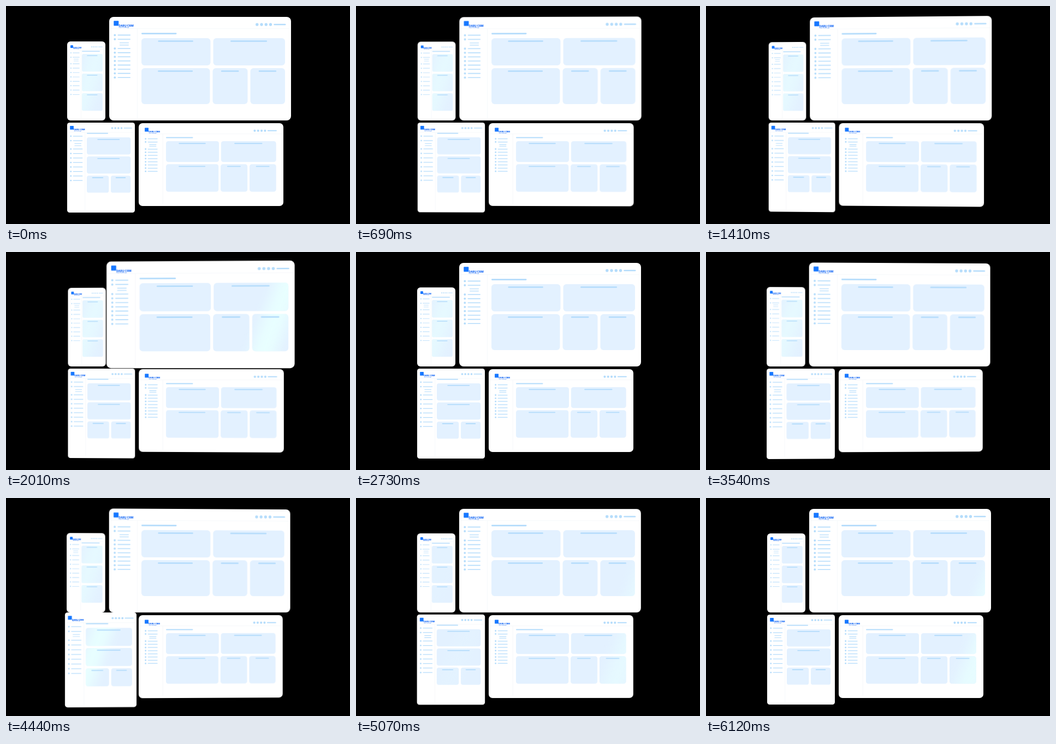
An HTML page for the animation above (6.45 s loop, 630 px wide and 400 px high).

```html
<!DOCTYPE html>
<html lang="en">
<head>
<meta charset="utf-8">
<title>Tilting dashboards</title>
<style>
html, body { margin: 0; width: 100%; height: 100%; overflow: hidden; background: #000; }
svg { display: block; position: absolute; left: 0; top: 0; width: 630px; height: 400px; transform-origin: 315px 205px; }
text { font-family: Inter, "Open Sans", sans-serif; fill: #1769f5; }
.name { font-weight: 800; }
.tag { font-weight: 600; }
</style>
</head>
<body>
<svg id="scene" viewBox="0 0 630 400"></svg>
<script>
const LOOP = 6450;
const BLUE = '#1677ff', LINE = '#b4dcfb', CARD = '#e3f1ff', EDGE = '#f2f6fa', SHINE = '#e8ffff';

// Timing: ramp eases 0 to 1; pulse rises over a..b and falls over c..d.
const clamp = u => Math.min(1, Math.max(0, u));
const ramp = (t, a, b) => { const u = clamp((t - a) / (b - a)); return u * u * (3 - 2 * u); };
const pulse = (t, a, b, c, d) => ramp(t, a, b) - ramp(t, c, d);
const glide = (t, a, b, from, to) => to - (to - from) * (1 - clamp((t - a) / (b - a))) ** 2;

// Degrees; positive brings the right side nearer.
const turn = t => 5 * pulse(t, 250, 1350, 1450, 2750) - 2.9 * pulse(t, 2700, 3600, 4440, 5280);

const rect = (x, y, w, h, r, fill) =>
  `<rect x="${x}" y="${y}" width="${w}" height="${h}" rx="${r}" fill="${fill}"/>`;
const dot = (x, y, r) => `<circle cx="${x}" cy="${y}" r="${r}" fill="${LINE}"/>`;
const bar = (x, y, w, th) => rect(x, y - th / 2, w, th, th / 2, LINE);
const repeat = (n, make) => Array.from({ length: n }, (_, i) => make(i)).join('');

function logo({ x, y }, k) {
  return rect(x, y, 9 * k, 9 * k, 0.8 * k, BLUE) +
    `<text class="name" x="${x + 9.3 * k}" y="${y + 11 * k}" font-size="${5 * k}">DARU CRM</text>` +
    `<text class="tag" x="${x + 9.3 * k}" y="${y + 13 * k}" font-size="${1.75 * k}">Simple Cloud Manager</text>`;
}

// Ten rows; two short sub-rows sit in the fold after the second.
function sidebar({ x, y, step, fold }, k) {
  const rowY = i => i < 2 ? y + step * i : y + fold + step * (i - 2);
  return repeat(10, i => dot(x, rowY(i), 1.9 * k) + bar(x + 5.2 * k, rowY(i), 23.5 * k, 1.6 * k)) +
    repeat(2, i => bar(x + 8.7 * k, y + fold * (0.58 + 0.16 * i), 17 * k, 1.4 * k));
}

function header({ x, y, k }) {
  return repeat(4, i => dot(x + 8.23 * k * i, y, 2.7 * k)) + bar(x + 30.5 * k, y, 22.2 * k, 2.5 * k);
}

// Each grid row is a height followed by the card widths.
function layout({ x, y, gap, rows }) {
  const cards = [];
  for (const [h, ...widths] of rows) {
    let left = x;
    for (const w of widths) {
      cards.push({ x: left, y, w, h });
      left += w + gap;
    }
    y += h + gap;
  }
  return cards;
}

function content(id, c) {
  const { k, th, grid } = c, cards = layout(grid);
  const fills = fill => cards.map(a => rect(a.x, a.y, a.w, a.h, th * 2.2, fill)).join('');
  return fills(CARD) + `<g id="shine-${id}">${fills(`url(#glare-${id})`)}</g>` +
    cards.map(a => bar(a.x + a.w * 0.24, a.y + th * 2.1, a.w * 0.51, th)).join('') +
    bar(grid.x, grid.y - c.titleUp, c.titleWidth, th) +
    logo(c.logo, k) + sidebar(c.side, k) + header(c.head);
}

const desktop = {
  k: 1, th: 2.6, titleUp: 8.4, titleWidth: 64.5,
  logo: { x: 197.3, y: 27.2 },
  side: { x: 199.3, y: 53.4, step: 7.6, fold: 24.6 },
  head: { x: 459.8, y: 34, k: 1 },
  grid: { x: 248, y: 59, gap: 5, rows: [[50, 126.5, 131.5], [66, 125.5, 64, 63.5]] }
};
const tablet = {
  k: 0.75, th: 1.8, titleUp: 7.4, titleWidth: 39,
  logo: { x: 117.2, y: 220 },
  side: { x: 118.8, y: 238.8, step: 8.25, fold: 23.6 },
  head: { x: 194.5, y: 224, k: 0.69 },
  grid: { x: 148, y: 241, gap: 3.7, rows: [[31.4, 80.3], [31.4, 80.3], [31.4, 40.3, 36.3]] }
};
const phone = {
  k: 0.55, th: 1.4, titleUp: 5, titleWidth: 33,
  logo: { x: 118, y: 72 },
  side: { x: 119, y: 86, step: 8.05, fold: 20 },
  head: { x: 157, y: 75, k: 0.38 },
  grid: { x: 139, y: 88, gap: 3.7, rows: [[32.3, 38], [32.3, 38], [32.3, 38]] }
};

// lift: hover amount; shine: glare strength; shineX: glare centre.
const panels = [
  { id: 'phone', content: phone, x: 112, y: 65, w: 70, h: 145, r: 6, ruleX: 137.5, ruleY: 80, glare: [38, 140],
    lift: t => 0, shine: t => 0.6 * (1 - ramp(t, 4500, 5250)), shineX: t => 150 },
  { id: 'desktop', content: desktop, x: 189, y: 20, w: 333, h: 190, r: 8, ruleX: 240.5, ruleY: 41.5, glare: [42, 85],
    lift: t => pulse(t, 1420, 1760, 1800, 2350),
    shine: t => pulse(t, 1420, 1760, 2010, 2600) + 0.8 * ramp(t, 4650, 5280),
    shineX: t => glide(t, 1420, 2700, 380, 552) },
  { id: 'tablet', content: tablet, x: 112, y: 214, w: 124, h: 165, r: 4.5, ruleX: 144.7, ruleY: 232, glare: [34, 290],
    lift: t => pulse(t, 4000, 4330, 4600, 5150),
    shine: t => pulse(t, 4020, 4350, 4600, 5200),
    shineX: t => glide(t, 4440, 5280, 160, 190) },
  { id: 'laptop', content: desktop, x: 243, y: 215, w: 265, h: 152, r: 7, ruleX: 287.2, ruleY: 234.6, glare: [55, 125],
    map: 'translate(293 248) scale(.767) translate(-248 -59)',
    lift: t => 0, shine: t => 0.85 * ramp(t, 4700, 5280), shineX: t => glide(t, 4700, 5280, 440, 514) }
];

function panelMarkup(p) {
  const { id, x, y, w, h, ruleX, ruleY } = p, half = p.glare[0];
  const stops = repeat(9, i =>
    `<stop offset="${i / 8}" stop-color="${SHINE}" stop-opacity="${0.95 * Math.sin(Math.PI * i / 8) ** 2}"/>`);
  return `<g id="${id}">
    <linearGradient id="glare-${id}" gradientUnits="userSpaceOnUse" x1="${-half}" y1="0" x2="${half}" y2="0">${stops}</linearGradient>
    ${rect(x, y, w, h, p.r, '#fff')}
    <path d="M${x + 3} ${ruleY}H${x + w - 3}M${ruleX} ${ruleY}V${y + h - 4}" stroke="${EDGE}" stroke-width=".7"/>
    <g transform="${p.map || ''}">${content(id, p.content)}</g></g>`;
}

const el = id => document.getElementById(id);
const scene = el('scene');
scene.innerHTML = panels.map(panelMarkup).join('');

function draw() {
  const t = performance.now() % LOOP;
  scene.style.transform = `perspective(1800px) rotateY(${-turn(t)}deg)`;
  for (const p of panels) {
    const cx = p.x + p.w / 2, cy = p.y + p.h / 2;
    el(p.id).setAttribute('transform',
      `translate(${cx} ${cy}) scale(${1 + 0.05 * p.lift(t)}) translate(${-cx} ${-cy})`);
    el('shine-' + p.id).setAttribute('opacity', p.shine(t));
    el('glare-' + p.id).setAttribute('gradientTransform',
      `translate(${p.shineX(t)} ${p.glare[1]}) rotate(20)`);
  }
  requestAnimationFrame(draw);
}
draw();
</script>
</body>
</html>
```
